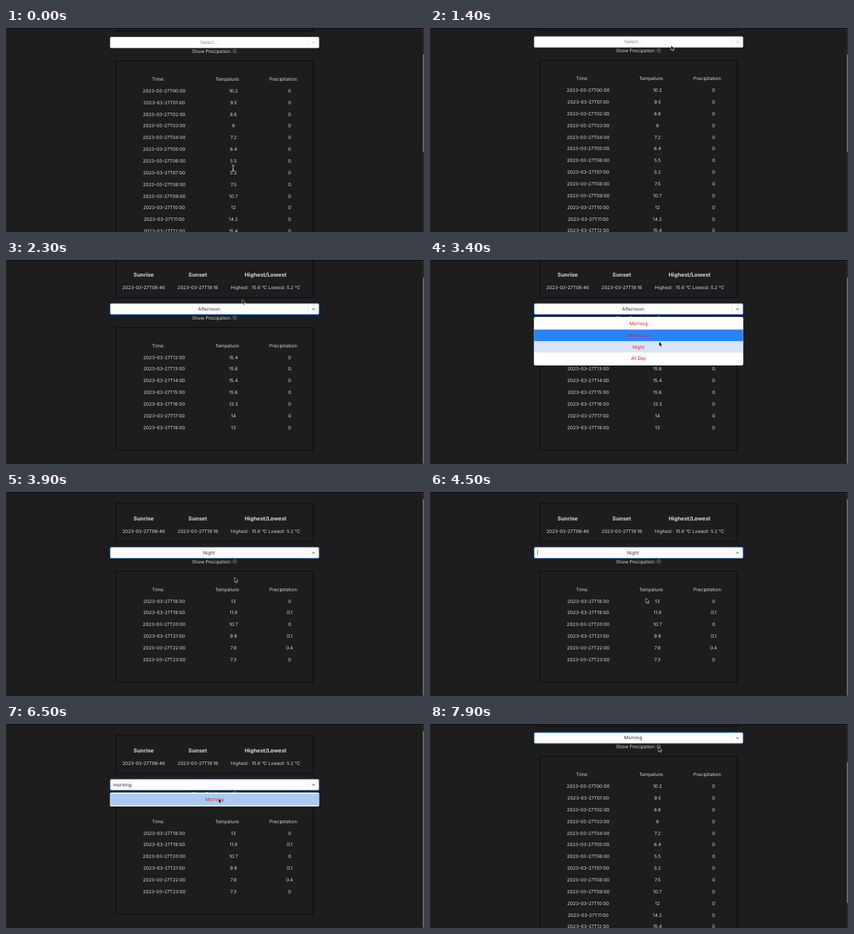
Animation, 600 px wide and 294 px high, one loop 8 s. Source, as an HTML page:

```html
<!DOCTYPE html>
<html lang="en">
<head>
<meta charset="utf-8">
<title>Weather table</title>
<style>
  html, body { margin: 0; width: 100%; height: 100%; overflow: hidden; background: #1d1d1d; }
  svg { display: block; width: 600px; height: 294px; }
  text { font: 400 6.67px Inter, "Liberation Sans", sans-serif; fill: #d8d8d8;
         text-anchor: middle; text-rendering: geometricPrecision; white-space: pre; }
  .head { font-size: 7.8px; font-weight: 700; }
  .value { fill: #333; }
  .hint { fill: #808080; }
  .typed { fill: #222; text-anchor: start; }
  .option { fill: #f01822; }
</style>
</head>
<body>
<svg id="stage" viewBox="0 0 600 294" xmlns="http://www.w3.org/2000/svg"></svg>
<script>
const LOOP = 8000, STEP = 100, PITCH = 16.86, VIEW = 292;
const temps = [10.2, 9.5, 8.6, 8, 7.2, 6.4, 5.5, 5.2, 7.5, 10.7, 12, 14.2,
  15.4, 15.6, 15.4, 15.6, 13.3, 14, 13, 11.9, 10.7, 9.9, 7.9, 7.3];
const rain = { 19: 0.1, 21: 0.1, 22: 0.4 };
const options = ['Morning', 'Afternoon', 'Night', 'All Day'];
const hours = { '': [0, 23], Morning: [0, 12], Afternoon: [12, 18], Night: [18, 23] };

// Each step overrides the state from its time on.
const steps = [
  [0, { value: '', shift: -66.6, focus: false, menu: null, hot: '', pressed: false, typed: '', caret: false }],
  [100, { shift: -67.4 }],
  [1600, { focus: true, menu: options, hot: 'Morning' }],
  [1900, { hot: 'Afternoon' }],
  [2100, { pressed: true }],
  [2200, { value: 'Afternoon', shift: -16.9, menu: null, pressed: false }],
  [3000, { menu: options, hot: 'Afternoon' }],
  [3300, { hot: 'Night' }],
  [3500, { pressed: true }],
  [3600, { value: 'Night', shift: 0, menu: null, pressed: false }],
  [4500, { caret: true }],
  [4800, { menu: options, hot: 'Night' }],
  [5000, { menu: ['Morning'], hot: 'Morning', typed: 'm' }],
  [5300, { typed: 'mo' }],
  [5500, { typed: 'mor' }],
  [5700, { typed: 'morn' }],
  [5800, { typed: 'morni' }],
  [5900, { typed: 'mornin' }],
  [6000, { typed: 'morning' }],
  [6300, { caret: false }],
  [6500, { pressed: true }],
  [6600, { value: 'Morning', shift: -67.4, menu: null, pressed: false, typed: '' }]
];

// time, x, y, shape shown from that time on
const path = [
  [0, 326, 202, 'beam'], [500, 326, 202, 'beam'], [600, 326, 202.6, 'beam'], [700, 326, 202.6, 'beam'],
  [800, 328, 194, 'arrow'], [1400, 346, 25, 'arrow'], [1600, 344, 21, 'arrow'], [1700, 344, 24, 'arrow'],
  [2100, 339, 57, 'arrow'], [2600, 339, 57, 'arrow'], [3000, 336, 70, 'arrow'], [3500, 328, 123, 'arrow'],
  [3900, 328, 123, 'arrow'], [4500, 310, 153, 'arrow'], [4600, 310, 153, 'none'],
  [6200, 305, 109, 'arrow'], [6400, 305, 107, 'arrow'], [6700, 305, 107, 'arrow'],
  [7200, 445, 22, 'arrow'], [7600, 328, 33, 'arrow'], [7700, 328, 32.5, 'arrow'],
  [7800, 328, 32.5, 'arrow'], [7900, 328, 33, 'arrow'], [8000, 328, 33, 'arrow']
];

const text = (x, y, s, cls = '') =>
  `<text x="${x}" y="${y + (cls === 'head' ? 2.8 : 2.4)}" class="${cls}">${s}</text>`;
const rect = (x, y, w, h, fill, extra = '') =>
  `<rect x="${x}" y="${y}" width="${w}" height="${h}" fill="${fill}" ${extra}/>`;
const frame = (y, h) => rect(157.8, y, 282.9, h, 'none', 'stroke="#090909" stroke-width=".9"');

function stateAt(t) {
  return Object.assign({}, ...steps.filter(s => s[0] <= t).map(s => s[1]));
}

function pointerAt(t) {
  const i = path.findLastIndex(p => p[0] <= t);
  const a = path[i], b = path[i + 1] || a;
  const u = b === a ? 0 : (t - a[0]) / (b[0] - a[0]);
  const k = u * u * (3 - 2 * u);
  return { x: a[1] + (b[1] - a[1]) * k, y: a[2] + (b[2] - a[2]) * k, shape: a[3] };
}

function summary() {
  return frame(16, 55) +
    text(197.7, 38, 'Sunrise', 'head') + text(275.2, 38, 'Sunset', 'head') +
    text(372.6, 38, 'Highest/Lowest', 'head') +
    text(197.5, 57, '2023-03-27T06:46') + text(275.3, 57, '2023-03-27T19:16') +
    text(372.6, 57, 'Highest : 15.6 °C Lowest: 5.2 °C');
}

function table(first, last) {
  let out = frame(114.2, 160 + (last - first - 5) * PITCH) +
    text(218.5, 140.3, 'Time:') + text(318, 140.3, 'Tempature:') + text(398.7, 140.3, 'Precipitation:');
  for (let h = first; h <= last; h++) {
    const y = 157.1 + (h - first) * PITCH;
    out += text(227, y, `2023-03-27T${String(h).padStart(2, '0')}:00`) +
      text(326.5, y, temps[h]) + text(407, y, rain[h] || 0);
  }
  return out;
}

function picker(s) {
  const edge = s.focus ? 'stroke="#2684ff" stroke-width=".85"' : 'stroke="#ccc" stroke-width=".42"';
  let out = rect(149.5, 79.6, 299.8, 15.8, '#fff', `rx="1.6" ${edge}`) +
    rect(433.6, 82.9, 0.45, 9.2, '#ccc') +
    `<path d="M439.2 86.4l2.2 2.2 2.2-2.2" fill="none" stroke="${s.focus ? '#444' : '#bbb'}" stroke-width="1"/>`;
  if (s.typed) out += text(154, 87.5, s.typed, 'typed');
  else out += text(291.5, 87.5, s.value || 'Select...', s.value ? 'value' : 'hint');
  if (s.caret) {
    const x = 154.2 + [0, 5.9, 9.9, 12.4, 16.4, 18, 22, 26.2][s.typed.length];
    out += rect(x, 83.4, 0.5, 8, '#111');
  }
  return out;
}

function menu(s) {
  if (!s.menu) return '';
  let out = rect(149.4, 98.8, 300, 3.3 + s.menu.length * 16.67, '#fff', 'rx="1.6"');
  s.menu.forEach((name, i) => {
    const y = 100.5 + i * 16.67;
    const fill = name === s.hot && s.pressed ? '#a8caf3' :
      name === s.value ? '#2684ff' : name === s.hot ? '#dae5fb' : '#fff';
    out += rect(149.4, y, 300, 16.67, fill) + text(299.4, y + 8.3, name, 'option');
  });
  return out;
}

function checkbox() {
  return text(295.5, 100.3, 'Show Precipation:') +
    rect(325.9, 97.6, 4.8, 4.8, '#3b3b3b', 'rx=".9" stroke="#858585" stroke-width=".5"');
}

function scrollbar(s, count) {
  const height = 419 + (count - 13) * PITCH;
  const top = 1 + (9.6 - s.shift) * VIEW / height;
  const size = Math.min(VIEW * VIEW / height, 294 - top);
  return rect(597.6, 1, 2.4, 293, '#292929') +
    rect(598.4, top, 1.6, size, '#737373', 'rx=".8"');
}

function pointer({ x, y, shape }) {
  const at = `transform="translate(${x} ${y})"`;
  if (shape === 'arrow') {
    return `<path ${at} d="M0 0V7L1.6 5.5 2.6 8 3.8 7.5 2.8 5.1H4.9Z" fill="#000" stroke="#eee" stroke-width=".6"/>`;
  }
  if (shape === 'beam') {
    return `<path ${at} d="M-2-4.3Q0-4.3 0-3V3.2Q0 4.5-2 4.5M2-4.3Q0-4.3 0-3M0 3.2Q0 4.5 2 4.5M-1 1.8H1" fill="none" stroke="#e4e4e4" stroke-width=".8"/>`;
  }
  return '';
}

const stage = document.getElementById('stage');
let shown = -1;

function draw(t) {
  const s = stateAt(t);
  const [first, last] = hours[s.value];
  stage.innerHTML = rect(0, 0, 600, 294, '#1d1d1d') +
    `<g transform="translate(0 ${s.shift})">` +
    summary() + checkbox() + table(first, last) + picker(s) + menu(s) + '</g>' +
    rect(0, 0, 600, 1, '#0c0c0c') + scrollbar(s, last - first + 1) + pointer(pointerAt(t));
}

function tick() {
  const t = Math.floor(performance.now() % LOOP / STEP) * STEP;
  if (t !== shown) draw(shown = t);
  requestAnimationFrame(tick);
}
tick();
</script>
</body>
</html>
```
